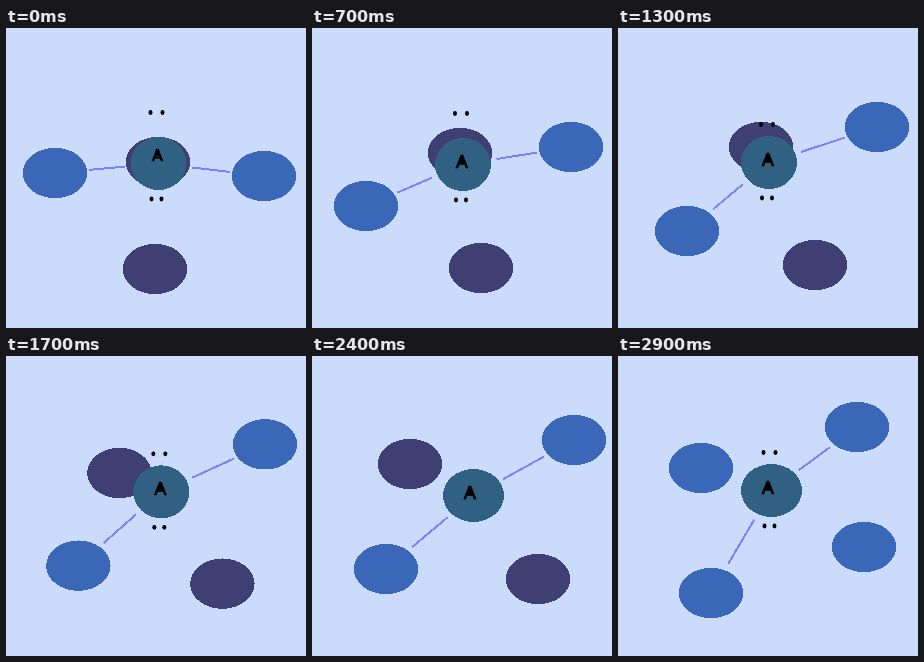
Recreate the animation shown at these times as an HTML page. Size 300 px wide and 300 px high, loop 3.2 s.

```html
<!DOCTYPE html>
<html lang="en">
<head>
<meta charset="utf-8">
<title>Atom A</title>
<style>
  html, body { margin: 0; width: 100%; height: 100%; overflow: hidden; background: #cbdbfc; }
  svg { display: block; width: 100%; height: 100%; }
  text { font-family: "DejaVu Sans", sans-serif; text-anchor: middle; stroke: #000; stroke-width: .7; }
</style>
</head>
<body>
<svg id="stage" viewBox="0 0 300 300" shape-rendering="crispEdges"></svg>
<script>
const LOOP = 3200;
const BLUE = '#3a67b8', DARK = '#3f3f74', TEAL = '#306082', BOND = '#8080ff';
const BOND_GAP = 34;

// The drawing is held between these times
const poseTimes = [0, 400, 500, 600, 700, 1000, 1300, 1700, 1800, 1900, 2000, 2100, 2500];

// Key points: [time, x, y]
const paths = {
  bottom: [[0, 149, 241], [700, 169, 240], [1300, 197, 237], [1900, 226, 223], [2100, 226, 223], [2500, 246, 191]],
  left: [[0, 49, 145], [400, 45, 161.5], [700, 54, 178], [1300, 69, 203], [1900, 74, 213], [2100, 74, 213], [2500, 93, 237]],
  right: [[0, 258, 148], [400, 260, 137], [700, 259, 119], [1300, 259, 99], [1900, 259, 83], [2100, 262, 84], [2500, 239, 71]],
  top: [[0, 152, 134], [700, 148, 125], [1300, 143, 119], [1900, 98.5, 116], [2100, 98, 108], [2500, 83, 112]],
  core: [[0, 152.5, 135.5], [700, 151, 136.5], [1300, 151, 134.5], [1900, 157.5, 136.5], [2100, 161.5, 139.5], [2500, 153.5, 134.5]]
};

const within = (t, from, to) => t >= from && t < to;
const dotsVisible = t => t < 400 || within(t, 600, 1000) || within(t, 1300, 2300) || t >= 2900;

function pointAt(path, t) {
  const i = path.findLastIndex(key => key[0] <= t);
  const [t0, x0, y0] = path[i], [t1, x1, y1] = path[i + 1] || [t0 + 1, x0, y0];
  const k = (t - t0) / (t1 - t0);
  return { cx: x0 + (x1 - x0) * k, cy: y0 + (y1 - y0) * k };
}

// Segment between two centres, shortened equally at both ends
function bondBetween(a, b) {
  const dx = b.cx - a.cx, dy = b.cy - a.cy, k = BOND_GAP / Math.hypot(dx, dy);
  return { x1: a.cx + dx * k, y1: a.cy + dy * k, x2: b.cx - dx * k, y2: b.cy - dy * k };
}

const stage = document.getElementById('stage');

function set(node, attrs) {
  for (const name in attrs) node.setAttribute(name, attrs[name]);
  return node;
}

function add(tag, attrs) {
  const node = document.createElementNS('http://www.w3.org/2000/svg', tag);
  stage.append(node);
  return set(node, attrs);
}

const ball = fill => add('ellipse', { rx: 32.2, ry: 25.2, fill });
const nodes = { bottom: ball(DARK), left: ball(BLUE), right: ball(BLUE), top: ball(DARK), core: ball(TEAL) };
const bonds = {};
for (const name of ['left', 'right']) bonds[name] = add('line', { stroke: BOND, 'stroke-width': 2 });
const dots = Array.from({ length: 4 }, () => add('ellipse', { rx: 2, ry: 2.4, 'shape-rendering': 'auto' }));
const letter = add('text');
letter.textContent = 'A';
const peak = add('path');

function draw(t) {
  const poseTime = poseTimes.findLast(time => time <= t);
  const points = {};
  for (const name in paths) set(nodes[name], points[name] = pointAt(paths[name], poseTime));
  for (const name in bonds) set(bonds[name], bondBetween(points.core, points[name]));
  for (const name of ['top', 'bottom']) set(nodes[name], { fill: t < 2700 ? DARK : BLUE });

  const { cx, cy } = points.core;
  const rx = t < 1900 ? 28 : 30.5;
  set(nodes.core, { rx, ry: 26.5 });

  const rise = t < 1300 ? 51 : 38;
  dots.forEach((dot, i) => {
    const above = i < 2, side = i % 2 ? 1 : -1;
    set(dot, {
      cx: cx - 2 + side * (above ? 6 : 5),
      cy: cy + (above ? -rise : 35.5),
      visibility: dotsVisible(t) ? 'visible' : 'hidden'
    });
  });

  const x = cx - rx + 27, y = cy + (t < 200 ? -3 : 3);
  set(letter, { x, y, 'font-size': t < 200 ? 16 : 18 });
  set(peak, { d: `M${x} ${y - 11}l3 6h-6z` });
}

function tick(now) {
  draw(now % LOOP);
  requestAnimationFrame(tick);
}
draw(0);
requestAnimationFrame(tick);
</script>
</body>
</html>
```
